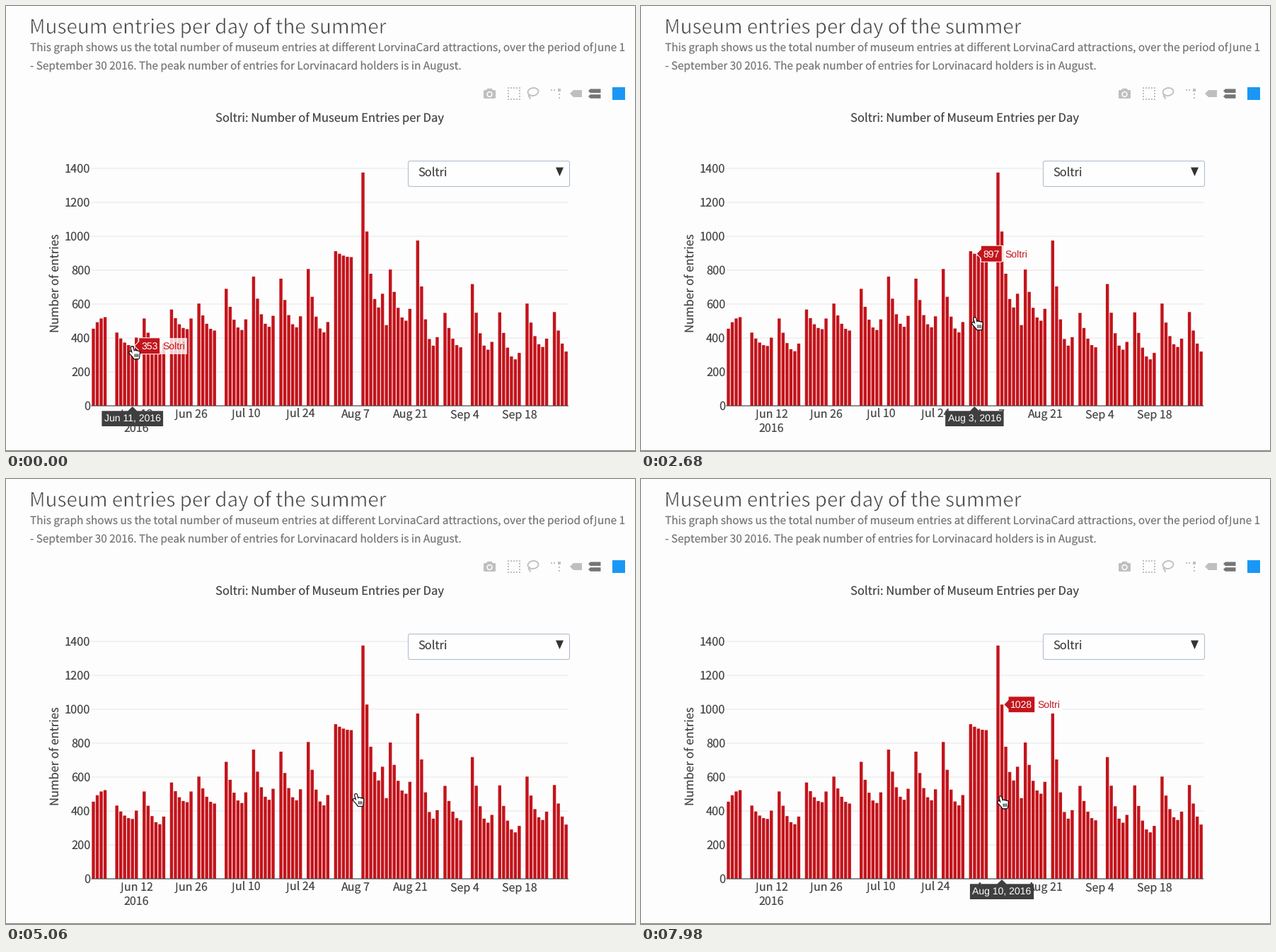
Animation, 889 px wide and 630 px high, one loop 8 s. Source, as a matplotlib script:

```python
import numpy as np
import matplotlib.pyplot as plt
from matplotlib.animation import FuncAnimation
from matplotlib.collections import PolyCollection
from matplotlib.patches import Circle, Ellipse, FancyBboxPatch, Polygon, Rectangle
from matplotlib.patheffects import Stroke
from matplotlib.textpath import TextPath

W, H, DPI = 889, 630, 72
LOOP, STEP = 8000, 40
BG, RED, DARK, GREY = "#fdfdfd", "#c3141b", "#464646", "#787878"
ICON, ICON_ON = "#bfbfbf", "#767676"
SANS, HOVER = "Noto Sans CJK JP", "Liberation Sans"
MUSEUM = "Soltri"
CHART, BODY, TIP = 16.4, 15.33, 14

MONTHS = [("Jun", 30), ("Jul", 31), ("Aug", 31), ("Sep", 30)]
DAYS = 122
DAY, X0, Y0 = 5.522, 123.5, 566

# Entries on the Tuesday and the Saturday of each week
TUESDAY = [402, 432, 515, 568, 603, 690, 762, 750, 807, 912,
           1376, 804, 975, 548, 718, 551, 603, 553]
SATURDAY = [523, 353, 322, 452, 444, 447, 466, 463, 433, 877,
            580, 502, 355, 345, 331, 274, 347, 305]

plt.rcParams["text.hinting"] = "none"
plt.rcParams["font.family"] = SANS
fig = plt.figure(figsize=(W / DPI, H / DPI), dpi=DPI, facecolor=BG)
ax = fig.add_axes([0, 0, 1, 1])
ax.set(xlim=(0, W), ylim=(H, 0))
ax.axis("off")


def date(i):
    for month, days in MONTHS:
        if i < days:
            return month, i + 1
        i -= days


def day_name(i):
    return "{} {}".format(*date(i))


def entries(i):
    """Falls from Tuesday to Saturday, recovers on Sunday, closed on Mondays."""
    week, k = divmod(i + 1, 7)
    month, day = date(i)
    low = SATURDAY[week]
    if k < 5:
        return round(low + (TUESDAY[week] - low) * (1 - k / 4) ** 2)
    if k == 5:
        return 0 if day <= 7 else round(1.14 * low)
    return round(0.82 * low) if (month, day) == ("Aug", 15) else 0


ENTRIES = [entries(i) for i in range(DAYS)]


def day_x(i):
    return X0 + DAY * i


def entry_y(v):
    return Y0 - 0.24 * v


def width(s, size, family=SANS):
    return TextPath((0, 0), s, size=size, prop={"family": family}).get_extents().width


def text(x, y, s, size=CHART, color=DARK, z=4, **kw):
    kw.setdefault("va", "baseline")
    return ax.text(x, y, s, fontsize=size, color=color, zorder=z, **kw)


def j_text(x, y, rest, size, color):
    """Text starting with a narrow, descending J; x is where the rest begins."""
    text(x, y, rest, size, color)
    text(x - 0.8, y, "J", size, color, ha="right", family="DejaVu Sans")


def shape(points, color, z=5, **kw):
    return ax.add_patch(Polygon(points, fc=color, zorder=z, **{"lw": 0, **kw}))


def line(xs, ys, color, lw=1, z=1, cap="butt"):
    return ax.plot(xs, ys, color=color, lw=lw, zorder=z, snap=False,
                   solid_capstyle=cap, solid_joinstyle="round")[0]


def rect(x, y, w, h, color, z=5):
    return ax.add_patch(Rectangle((x, y), w, h, fc=color, lw=0, zorder=z))


def draw_heading():
    title = text(33, 39, "Museum entries per day of the summer", 27.8)
    title.set_path_effects([Stroke(linewidth=0.65, foreground=BG)])
    text(34, 64, "This graph shows us the total number of museum entries at different "
         "LorvinaCard attractions, over the period of", BODY, GREY)
    j_text(836.5, 64, "une 1", BODY, GREY)
    text(34, 90, "- September 30 2016. The peak number of entries for Lorvinacard "
         "holders is in August.", BODY, GREY)
    rect(0, H - 1, W, 1, "#777777")


def tag(x, y, w, h):
    nose = min(5, h / 2)
    return [(x, y), (x + nose, y - h / 2), (x + w, y - h / 2),
            (x + w, y + h / 2), (x + nose, y + h / 2)]


def draw_toolbar():
    # camera
    ax.add_patch(FancyBboxPatch((676, 120), 15, 10, boxstyle="round,pad=1,rounding_size=1.5",
                                fc=ICON, lw=0, zorder=5))
    shape([(679, 119), (680.5, 116.8), (686.5, 116.8), (688, 119)], ICON)
    for r, color in ((4.2, BG), (2.6, ICON)):
        ax.add_patch(Circle((683.5, 125), r, fc=color, lw=0, zorder=6))
    # box select
    for p in range(0, 20, 4):
        for dx, dy in ((p, 0), (p, 16), (0, p), (16, p)):
            rect(709 + dx, 115 + dy, 2, 2, ICON)
    # lasso
    ax.add_patch(Ellipse((745, 121.5), 15, 11, angle=-10, fc="none", ec=ICON, lw=1.8, zorder=5))
    line([741, 738.5, 739, 741, 740.5], [125, 126.5, 128.5, 129, 132], ICON, 1.6, 5)
    # spike lines
    rect(779.5, 117, 4, 4, ICON)
    for k in range(2):
        rect(770 + 4 * k, 118, 2, 2, ICON)
        rect(780.5, 123.5 + 5 * k, 2, 2, ICON)
    # hover modes
    shape(tag(797, 124, 17, 10), ICON)
    for y in (120.2, 128):
        shape(tag(823, y, 17.5, 5.6), ICON_ON)
    rect(857, 115, 18, 18, "#1a97f5")


def bar(i, half=DAY * 0.4):
    x, y = day_x(i), entry_y(ENTRIES[i])
    return [(x - half, Y0), (x - half, y), (x + half, y), (x + half, Y0)]


def draw_chart():
    text(457.5, 164, f"{MUSEUM}: Number of Museum Entries per Day", 16.6, ha="center")
    text(70, 392, "Number of entries", 16.6, ha="center", va="center", rotation=90)
    for v in range(0, 1401, 200):
        y = entry_y(v)
        if v:
            line([121, 795], [y, y], "#e6e6ea")
        text(119.5, y + 6, str(v), ha="right")
    ax.add_collection(PolyCollection([bar(i) for i in range(DAYS)],
                                     fc=RED, lw=0, zorder=2, snap=False))
    line([120.5, 795], [Y0, Y0], DARK, 1.2, 3)
    for i in range(11, DAYS, 14):
        name, x = day_name(i), day_x(i)
        if name[0] == "J":
            j_text(x + 2 - width(name[1:], 16) / 2, 583, name[1:], 16, DARK)
        else:
            text(x, 583, name, 16, ha="center")
    text(day_x(11), 602.5, "2016", 16, ha="center")


def draw_dropdown():
    ax.add_patch(FancyBboxPatch((568.5, 219.5), 228, 36, boxstyle="round,pad=0,rounding_size=2.5",
                                fc="#fefefe", ec="#b0bfd0", lw=1.1, zorder=5))
    text(582, 241, MUSEUM, z=6)
    shape([(777, 228.5), (788, 228.5), (782.5, 241)], "#333333", 6)


draw_heading()
draw_toolbar()
draw_chart()
draw_dropdown()

# Hover labels
name_box = rect(0, 0, width(MUSEUM, TIP, HOVER) + 8, 23, "white", 8)
name_box.set_alpha(0.8)
name_text = text(0, 0, MUSEUM, TIP, RED, 9, family=HOVER)
value_box = shape([(0, 0), (1, 0), (1, 1)], RED, 9, ec="white", lw=1)
value_text = text(0, 0, "", TIP, "white", 10, family=HOVER)
date_box = shape([(0, 0), (1, 0), (1, 1)], "#3f3f3f", 9)
date_text = text(0, 588.5, "", TIP, "white", 10, family=HOVER, ha="center")
tips = [name_box, name_text, value_box, value_text, date_box, date_text]

# Hand pointer: round strokes that meet in the palm, black under white
GAP = (np.nan, np.nan)
HAND = [(-6.2, -0.4), (-0.3, 6), GAP, (-3.9, -7.2), (0, 7), GAP]
for k in range(3):
    HAND += [(0.6 + 2.4 * k, -2 + 0.6 * k), (0.8 + 1.9 * k, 7), GAP]
HAND = np.array(HAND)
CREASES = np.array([p for k in range(3)
                    for p in ((0.2 + 2.1 * k, 1.5), (0.2 + 2.1 * k, 6), GAP)])
pointer = [(line([], [], "black", 5, 12, "round"), HAND),
           (line([], [], "white", 2.8, 13, "round"), HAND),
           (line([], [], "black", 1, 14), CREASES)]

# The pointer crosses June and July quickly, then creeps along
KEY_T = [0, 200, 1800, 2500, 5720, 7980]
KEY_X = [182, 186, 426, 474, 505, 512]
PATH_X, PATH_Y = [182, 426, 480, 512], [491, 448, 450, 458]
LAG = 80            # the labels trail the pointer
BLANK = (3340, 3700)


def pointer_x(t):
    return np.interp(t, KEY_T, KEY_X)


def hovered(t):
    if BLANK[0] <= t < BLANK[1]:
        return None
    i = round((pointer_x(t - LAG) - 4 - X0) / DAY)
    return i if ENTRIES[i] else None


def show_tips(i):
    x, y, value = day_x(i), entry_y(ENTRIES[i]), str(ENTRIES[i])
    left, tip = x + 9, x + 2.7
    right = left + 0.556 * TIP * len(value) + 6.6
    value_box.set_xy([(tip, y), (left, y - 6.5), (left, y - 11.5), (right, y - 11.5),
                      (right, y + 11.5), (left, y + 11.5), (left, y + 6.5)])
    value_text.set_text(value)
    value_text.set_position((left + 3.3, y + 5))
    name_box.set_xy((right, y - 11.5))
    name_text.set_position((right + 4, y + 5))

    label = day_name(i) + ", 2016"
    half = width(label, TIP, HOVER) / 2 + 3.8
    date_box.set_xy([(x, 567), (x + 6.5, 573.3), (x + half, 573.3), (x + half, 595),
                     (x - half, 595), (x - half, 573.3), (x - 6.5, 573.3)])
    date_text.set_text(label)
    date_text.set_x(x)


def update(n):
    t = n * STEP
    x = pointer_x(t)
    y = np.interp(x, PATH_X, PATH_Y)
    for stroke, points in pointer:
        stroke.set_data(points[:, 0] + x, points[:, 1] + y)
    i = hovered(t)
    for artist in tips:
        artist.set_visible(i is not None)
    if i is not None:
        show_tips(i)
    return tips + [stroke for stroke, _ in pointer]


anim = FuncAnimation(fig, update, frames=LOOP // STEP, interval=STEP,
                     repeat=True, repeat_delay=0, blit=False)
plt.show()
```
